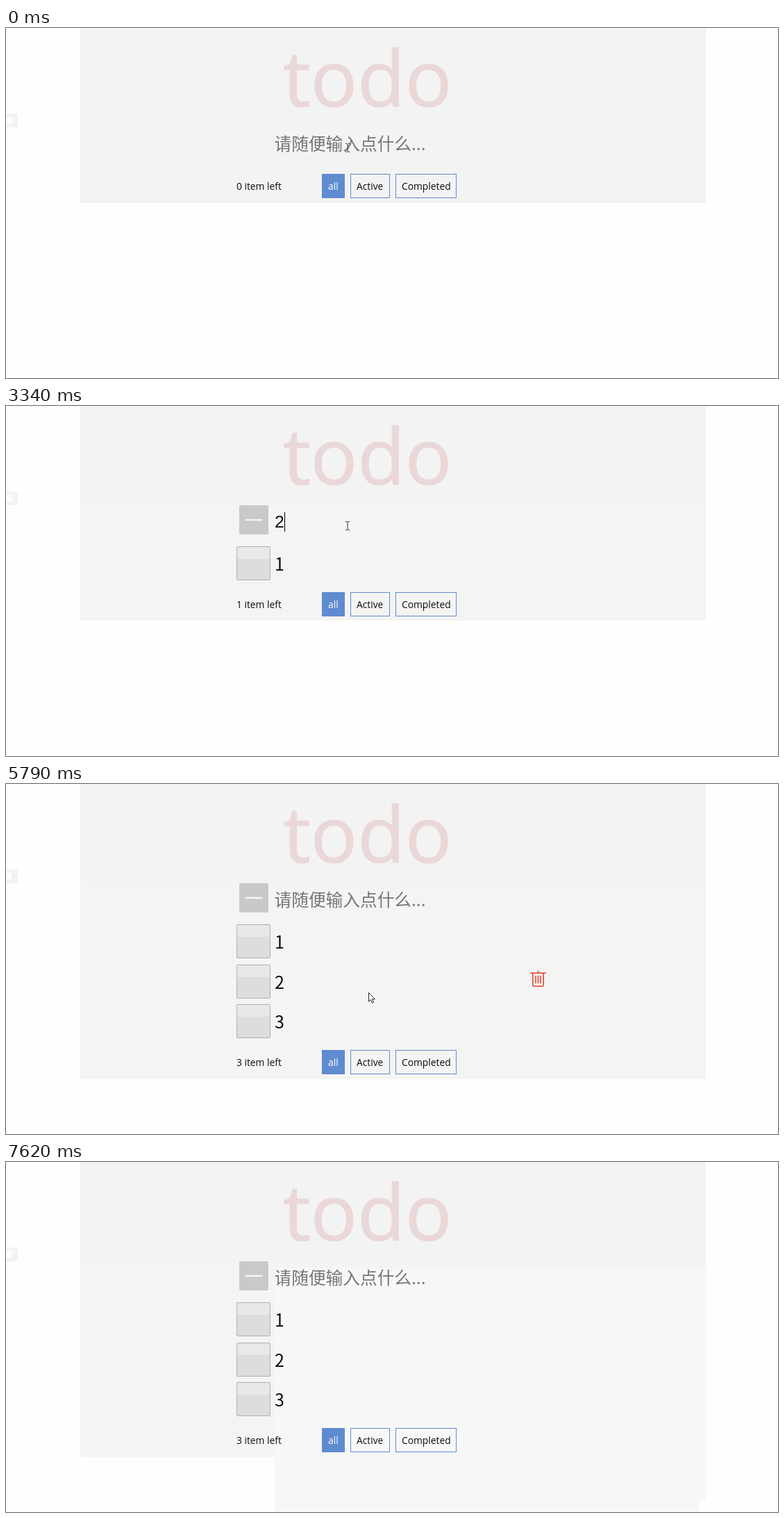
Animation of 1112x504 px, one loop 7720 ms. Source, as an HTML page:

```html
<!DOCTYPE html>
<html lang="zh">
<head>
<meta charset="utf-8">
<title>todo</title>
<style>
  html, body { margin: 0; width: 100%; height: 100%; overflow: hidden; background: #fefefe; }
  svg { display: block; width: 1112px; height: 504px; }
  text { font-family: "Open Sans", "Noto Sans", sans-serif; fill: #0c0c0c; white-space: pre; }
  .title { font-size: 112px; fill: #ead7d7; stroke: #ead7d7; stroke-width: 1.2; }
  .hint { font: 24.7px "Noto Sans CJK SC", "Noto Sans CJK", sans-serif; fill: #757575; }
  .typed { font: 24.7px "Liberation Sans", Arial, sans-serif; }
  .item { font: 25px "Noto Sans CJK SC", "Noto Sans CJK", sans-serif; }
  .small { font-size: 13.8px; }
  .frame { fill: none; stroke: #5f8bd0; }
  .trash { fill: none; stroke: #e03a2c; stroke-width: 1.5; }
</style>
</head>
<body>
<svg viewBox="0 0 1112 504">
  <rect y="123" x="-6" width="23" height="20" rx="3" fill="#f3f3f3"/>
  <rect y="128" width="8" height="10" fill="#fefefe"/>
  <rect id="panel" x="107" width="901" fill="#f3f3f3"/>
  <rect id="lower" x="107" y="143" width="901" fill="#f4f4f3"/>
  <path id="wash" d="M387 153H1008V488H998V503H387Z" fill="#f7f7f7"/>
  <text class="title" x="399" y="113">todo</text>

  <g id="toggle">
    <rect x="336" y="143" width="42" height="42" rx="2" fill="#c9c9c9"/>
    <path d="M346 164H368" stroke="#f4f4f4" stroke-width="2.6" stroke-linecap="round"/>
  </g>
  <text id="hint" class="hint" x="386.5" y="176">请随便输入点什么...</text>
  <text id="typed" class="typed" x="387" y="175"></text>
  <rect id="caret" y="153" width="1" height="28"/>

  <g id="rows"></g>

  <g id="footer">
    <text id="count" class="small" x="332" y="233"></text>
    <rect x="455" y="210" width="33" height="35" fill="#5f8bd0"/>
    <text class="small" x="464" y="233" style="fill:#fff">all</text>
    <rect class="frame" x="496.5" y="210.5" width="56" height="34"/>
    <text class="small" x="505" y="233">Active</text>
    <rect class="frame" x="561.5" y="210.5" width="87" height="34"/>
    <text class="small" x="570" y="233">Completed</text>
  </g>

  <path id="beam" fill="none" stroke="#333" d="M489 166.5H491L492 167.5L493 166.5H495M492 167V178M489 178.5H491L492 177.5L493 178.5H495"/>
  <path id="arrow" fill="#fff" stroke="#222" stroke-linejoin="round"
        d="M.5 .5V13.2L3.4 10.5L5.4 15.3L7.5 14.4L5.5 9.7H9.4Z"/>
</svg>
<script>
const LOOP = 7720, ROW = 57.7;
const $ = id => document.getElementById(id);
const show = (el, on) => { el.style.display = on ? "" : "none"; };
const offset = n => Math.round(n * ROW);

// time, item count, typed text
const entries = [
  [0, 0, ""], [2480, 0, "1"], [2850, 1, ""], [3340, 1, "2"],
  [4020, 2, ""], [4510, 2, "3"], [5230, 3, ""]
];

// the caret turns on and off in turn
const blinks = [1150, 1640, 2170, 3840, 4020, 5040, 5230, 5740, 6220, 6680, 7110, 7620];

// time, x, y of the pointer
const path = [
  [5460, 492, 172], [5600, 500, 214], [5790, 522, 300], [5960, 598, 306],
  [6100, 664, 330], [6180, 680, 372], [6270, 684, 419], [6330, 690, 426],
  [6500, 711, 444], [6560, 714, 444], [6950, 714, 444], [7110, 998, 488],
  [7440, 1077, 501]
];

$("rows").innerHTML = [1, 2, 3].map((n, i) => `
  <g transform="translate(0 ${offset(i)})">
    <rect x="332.5" y="202.5" width="48" height="48" rx="1.5" fill="#ddd"/>
    <rect x="333" y="203" width="47" height="17" fill="#e8e8e8"/>
    <rect x="332.5" y="202.5" width="48" height="48" rx="1.5" fill="none" stroke="#b0b0b0"/>
    <text class="item" x="387" y="237">${n}</text>
    <path class="trash" d="M755 214.3H778M766.5 211V214M758.8 214V231Q758.8 233.3 761 233.3H772Q774.2 233.3 774.2 231V214M763 218V229M766.5 218V229M770 218V229"/>
  </g>`).join("");
const rows = [...$("rows").children];

function pointerAt(t) {
  const k = path.findIndex(p => p[0] > t);
  if (k === 0) return path[0].slice(1);
  if (k < 0) return path[path.length - 1].slice(1);
  const [t0, x0, y0] = path[k - 1], [t1, x1, y1] = path[k];
  const u = (t - t0) / (t1 - t0);
  return [x0 + (x1 - x0) * u, y0 + (y1 - y0) * u].map(Math.round);
}

function render(t) {
  const [, count, typed] = entries.filter(e => e[0] <= t).pop();
  const shift = offset(count);
  const [x, y] = pointerAt(t);
  const moving = t >= 5500;
  const overInput = y < 190;
  const hovered = moving && x < 780 ? Math.floor((y - 198) / ROW) : -1;
  const bottom = 251.5 + count * ROW;

  $("panel").setAttribute("height", Math.round(bottom));
  $("lower").setAttribute("height", Math.round(bottom) - 143);
  show($("lower"), count);
  show($("toggle"), count);
  show($("wash"), t >= 7110);

  show($("hint"), !typed);
  $("typed").textContent = typed;
  $("caret").setAttribute("x", typed ? 401 : 387);
  show($("caret"), blinks.filter(b => b <= t).length % 2);

  rows.forEach((row, i) => {
    show(row, i < count);
    show(row.lastElementChild, i === hovered);
  });
  $("count").textContent = count + " item left";
  $("footer").setAttribute("transform", `translate(0 ${shift})`);

  show($("beam"), overInput);
  $("beam").setAttribute("transform", `translate(${x - 492} ${y - 172})`);
  show($("arrow"), !overInput && t < 7440);
  $("arrow").setAttribute("transform", `translate(${x} ${y})`);
}

const start = performance.now();
function tick() {
  render((performance.now() - start) % LOOP);
  requestAnimationFrame(tick);
}
tick();
</script>
</body>
</html>
```
